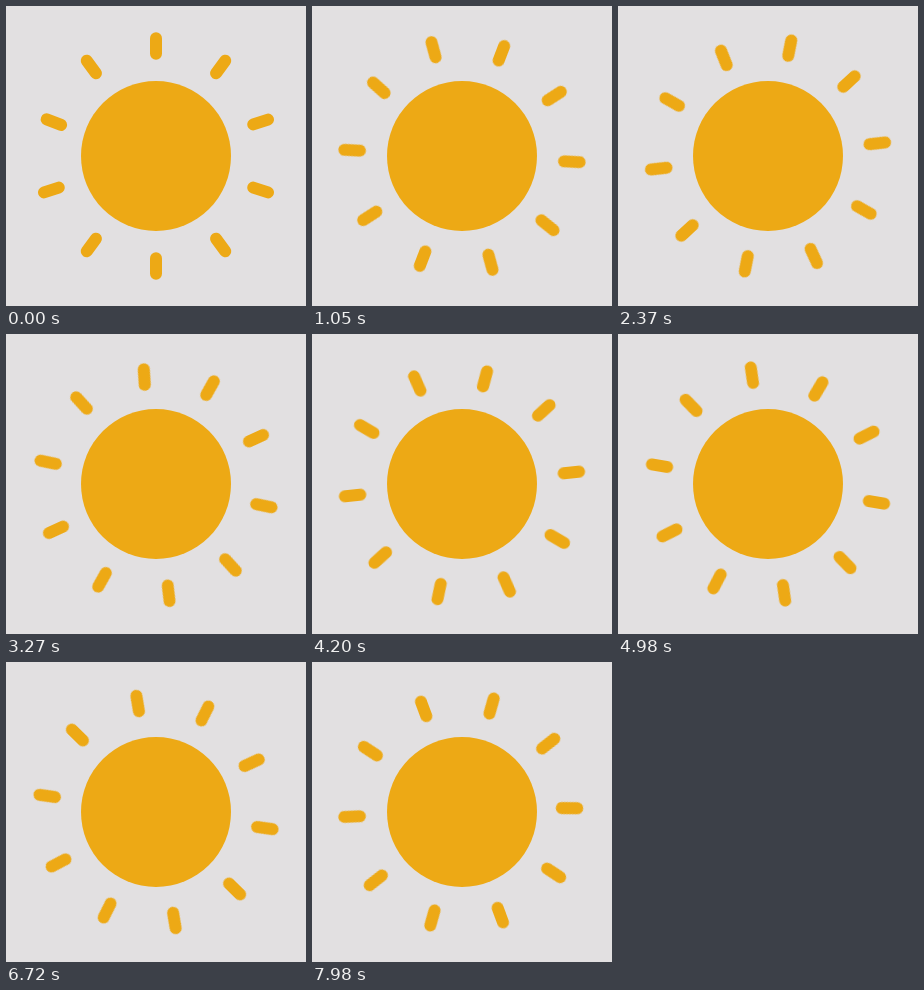
Recreate the animation shown at these times as an HTML page. Size 300x300 px, loop 8000 ms.

```html
<!DOCTYPE html>
<html lang="en">
<head>
<meta charset="utf-8">
<title>Sun</title>
<style>
  html, body {
    margin: 0;
    width: 100%;
    height: 100%;
    overflow: hidden;
    background: #e2e0e1;
  }
  svg {
    display: block;
    width: 100%;
    height: 100%;
  }
  .disc { fill: #eda915; }
  .rays {
    stroke: #eda915;
    stroke-width: 12;
    stroke-linecap: round;
    transform-origin: 150px 150px;
    animation: turn 8s infinite;
  }
  /* 0.6deg every 30ms, with a short last step */
  @keyframes turn {
    0% { transform: rotate(0deg); animation-timing-function: steps(266, end); }
    99.75%, 100% { transform: rotate(159.6deg); }
  }
</style>
</head>
<body>
<svg viewBox="0 0 300 300">
  <defs>
    <path id="ray" d="M150 32.2V47.8"/>
  </defs>
  <g class="rays">
    <use href="#ray"/>
    <use href="#ray" transform="rotate(36 150 150)"/>
    <use href="#ray" transform="rotate(72 150 150)"/>
    <use href="#ray" transform="rotate(108 150 150)"/>
    <use href="#ray" transform="rotate(144 150 150)"/>
    <use href="#ray" transform="rotate(180 150 150)"/>
    <use href="#ray" transform="rotate(216 150 150)"/>
    <use href="#ray" transform="rotate(252 150 150)"/>
    <use href="#ray" transform="rotate(324 150 150)"/>
    <!-- this ray sits closer in and leans slightly -->
    <path d="M40.7 113.3L55.1 118.9"/>
  </g>
  <circle class="disc" cx="150" cy="150" r="75"/>
</svg>
</body>
</html>
```
